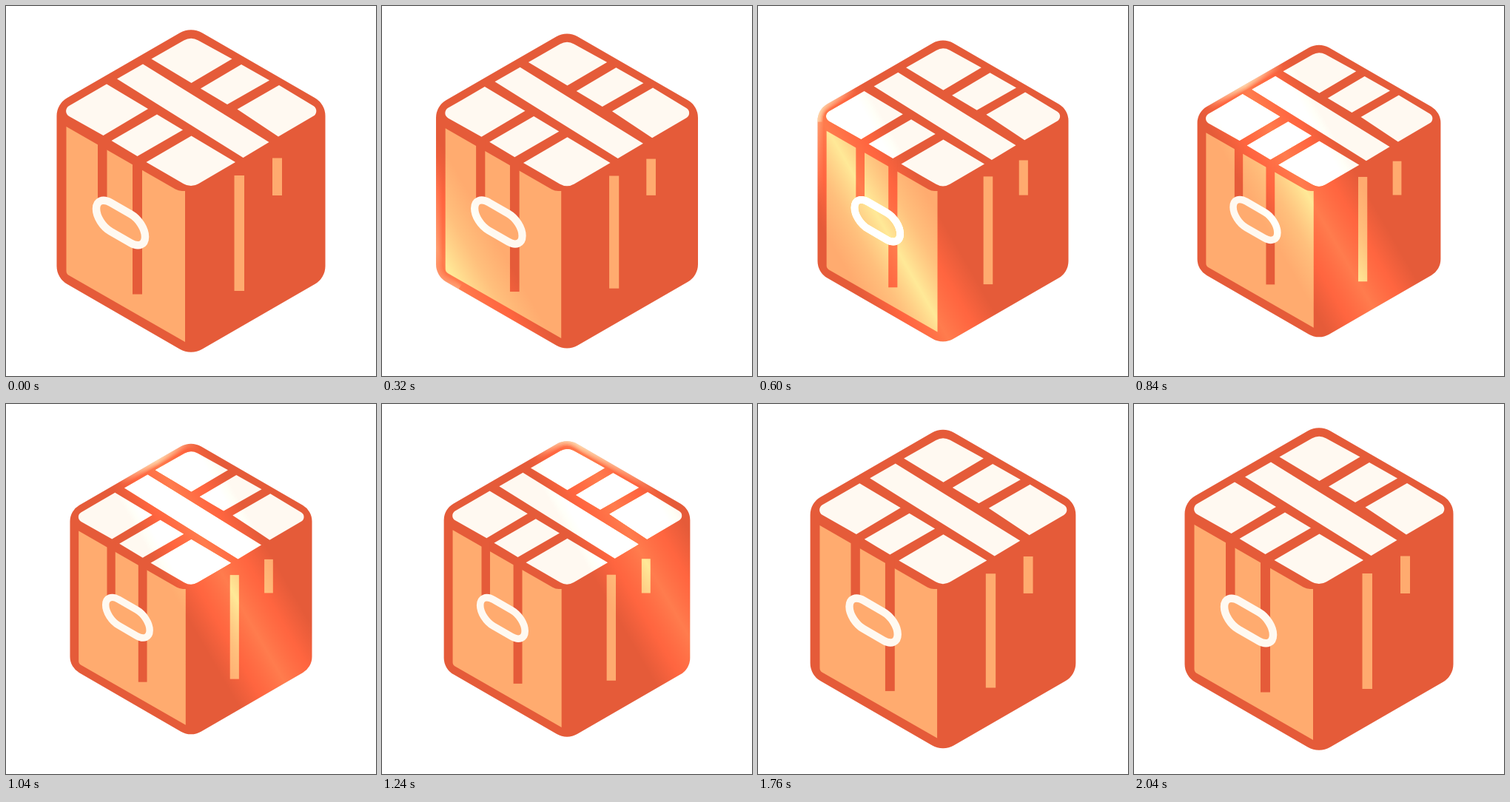
Recreate the animation shown at these times as an HTML page with a canvas. Size 500 px wide and 500 px high, loop 3000 ms.

```html
<!DOCTYPE html>
<html lang="en">
<head>
<meta charset="utf-8">
<title>Box with passing light</title>
<style>
html, body { margin: 0; width: 100%; height: 100%; overflow: hidden; background: #fff; }
canvas { display: block; }
</style>
</head>
<body>
<canvas id="stage" width="500" height="500"></canvas>
<script>
const ctx = document.getElementById('stage').getContext('2d');
const LOOP = 3000, STEP = 40, MID = 985;
const RED = '#e55b39', PEACH = '#ffab6f', CREAM = '#fff9f1';

// Points are [x, y, corner radius], in a 500 x 500 space
const outline = [[250, 27.5, 30], [431.5, 132.3, 28], [431.5, 367.7, 28],
                 [250, 472.5, 30], [68.5, 367.7, 28], [68.5, 132.3, 28]];
const topCells = [
  [[196.5, 71.5], [250, 41, 20], [305.5, 71.5], [250.5, 104]],
  [[263, 111.5], [318, 79], [356, 100.5], [299, 133]],
  [[312.5, 139.5], [369, 107], [427, 142, 8], [368, 176.5]],
  [[150, 98.5], [185, 78.5], [355.5, 184], [320.5, 205]],
  [[136, 105.5], [192, 139], [131.5, 175], [73, 142, 8]],
  [[142.5, 182], [204, 146.5], [239, 167.5], [177.5, 203]],
  [[189.5, 211], [250.5, 175.5], [310, 211], [250, 246, 20]],
];
const leftFace = [[81.5, 163], [233, 250, 18], [242, 250], [242, 454], [81.5, 362, 7]];

function tracePoly(pts) {
  const last = pts[pts.length - 1];
  ctx.beginPath();
  ctx.moveTo((last[0] + pts[0][0]) / 2, (last[1] + pts[0][1]) / 2);
  pts.forEach(([x, y, r = 0], i) => {
    const next = pts[(i + 1) % pts.length];
    ctx.arcTo(x, y, next[0], next[1], r);
  });
  ctx.closePath();
}

function fillPoly(pts, color) {
  tracePoly(pts);
  ctx.fillStyle = color;
  ctx.fill();
}

function bar(x, y, w, h, color) {
  ctx.fillStyle = color;
  ctx.fillRect(x, y, w, h);
}

function drawHandle() {
  ctx.save();
  ctx.translate(155, 293);
  ctx.beginPath();
  ctx.moveTo(-13.5, -27.3);
  for (const k of [1, -1]) {
    ctx.lineTo(13.5 * k, -11.7 * k - (k < 0 ? 0 : 0));
    ctx.bezierCurveTo(24.3 * k, -5.5 * k, 33 * k, 8.2 * k, 33 * k, 19 * k);
    ctx.bezierCurveTo(33 * k, 29.8 * k, 24.3 * k, 33.5 * k, 13.5 * k, 27.3 * k);
  }
  ctx.closePath();
  ctx.fillStyle = PEACH;
  ctx.fill();
  ctx.strokeStyle = CREAM;
  ctx.lineWidth = 10.5;
  ctx.stroke();
  ctx.restore();
}

function drawBox() {
  fillPoly(outline, RED);
  topCells.forEach(cell => fillPoly(cell, CREAM));
  fillPoly(leftFace, PEACH);
  bar(124, 180, 12.5, 90, RED);
  bar(171, 206, 13, 183.5, RED);
  bar(308.5, 229, 13.5, 156, PEACH);
  bar(360, 205.5, 13, 50.5, PEACH);
  drawHandle();
}

// Gradient across the diagonal light band, at distance pos from the centre
function bandGradient(pos, half, stops) {
  const at = d => [250 + d * 0.866, 250 - d * 0.5];
  const g = ctx.createLinearGradient(...at(pos - half), ...at(pos + half));
  stops.forEach((color, i) => g.addColorStop(i / (stops.length - 1), color));
  return g;
}

function edgeGlow(pts, widths, pos, alpha) {
  const clear = 'rgba(255,238,195,0)';
  ctx.strokeStyle = bandGradient(pos, 65, [clear, `rgba(255,238,195,${alpha})`, clear]);
  ctx.beginPath();
  ctx.moveTo(...pts[0]);
  for (let i = 1; i < pts.length - 1; i++) {
    ctx.arcTo(pts[i][0], pts[i][1], pts[i + 1][0], pts[i + 1][1], 28);
  }
  ctx.lineTo(...pts[pts.length - 1]);
  for (const w of widths) {
    ctx.lineWidth = w;
    ctx.stroke();
  }
}

function drawLight(pos) {
  ctx.save();
  tracePoly(outline);
  ctx.clip();
  ctx.globalCompositeOperation = 'color-dodge';
  ctx.fillStyle = bandGradient(pos, 78, ['#000', '#1c1c1c', '#444', '#1c1c1c', '#000']);
  ctx.fillRect(0, 0, 500, 500);
  ctx.globalCompositeOperation = 'source-over';
  edgeGlow([[68.5, 150], [68.5, 132.3], [250, 27.5], [431.5, 132.3], [431.5, 150]],
           [3, 6, 9, 12, 15], pos, 0.24);
  edgeGlow([[68.5, 150], [68.5, 367.7], [100, 386]], [4, 8, 12, 16], pos, 0.09);
  ctx.restore();
}

function draw(t) {
  const d = Math.min(1, Math.abs(t - MID) / MID);
  const scale = 0.9 + 0.1 * d * d * (3 - 2 * d);
  ctx.setTransform(1, 0, 0, 1, 0, 0);
  bar(0, 0, 500, 500, '#fff');
  ctx.translate(250, 250);
  ctx.scale(scale, scale);
  ctx.translate(-250, -250);
  drawBox();
  const pos = 0.345 * (t - 890);
  if (Math.abs(pos) < 295) drawLight(pos);
}

const start = performance.now();
function tick() {
  const t = (performance.now() - start) % LOOP;
  draw(Math.floor(t / STEP) * STEP);
  requestAnimationFrame(tick);
}
tick();
</script>
</body>
</html>
```
